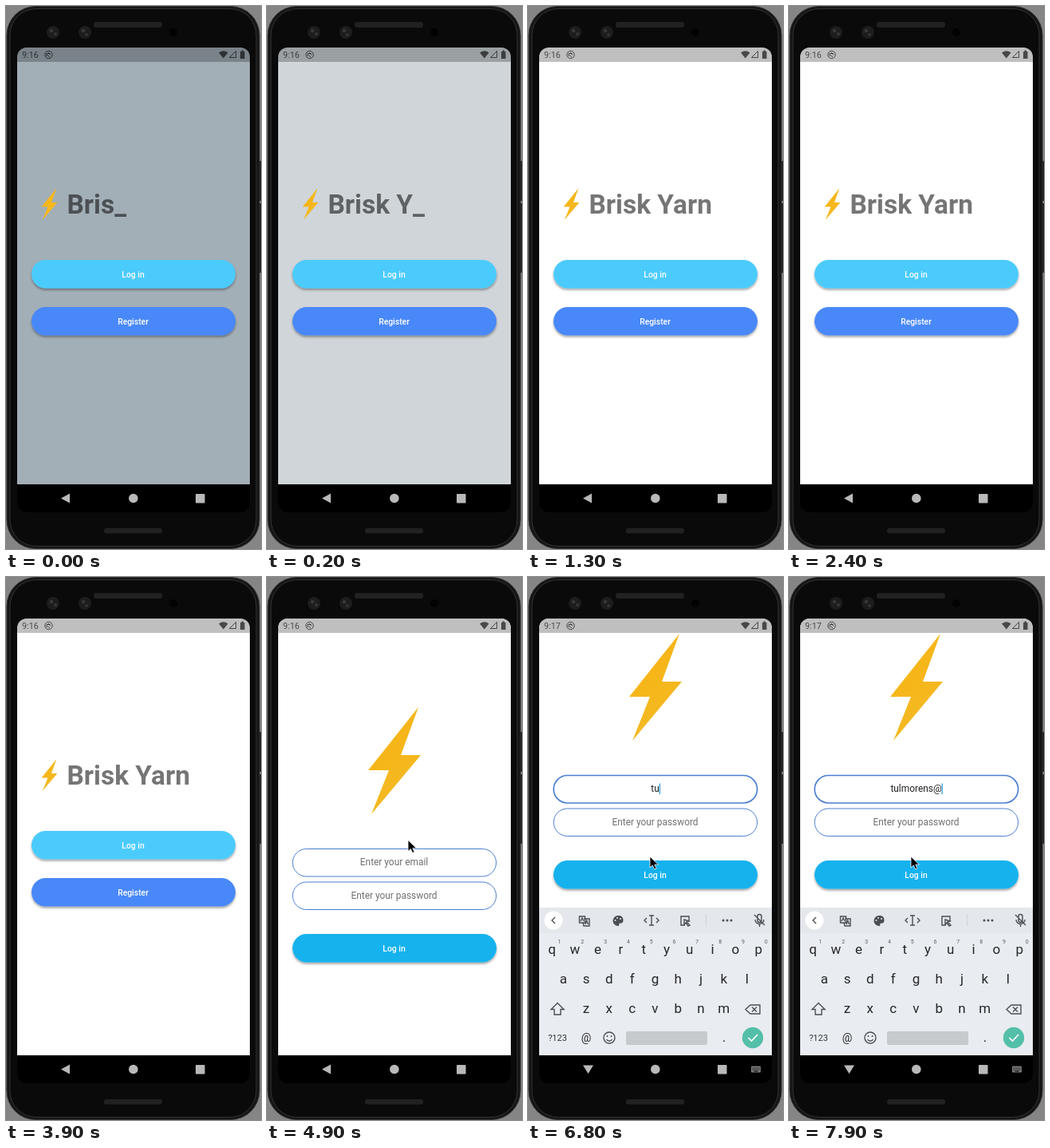
An HTML page for the animation above (8 s loop, 320 px wide and 680 px high).

```html
<!DOCTYPE html>
<html lang="en">
<head>
<meta charset="utf-8">
<style>
  html, body { margin: 0; width: 100%; height: 100%; overflow: hidden; background: #858585; }
  svg { display: block; width: 320px; height: 680px; font-family: Roboto, "Open Sans", sans-serif; }
  .label { font-size: 10.4px; font-weight: 500; fill: #fff; text-anchor: middle; }
  .field { font-size: 11.9px; fill: #6f6f6f; text-anchor: middle; }
  .outline { fill: #fff; stroke: #4a7fd0; }
  .icon { fill: none; stroke: #4b4f54; stroke-width: 1.4; }
  .key { font-size: 17px; fill: #25272a; text-anchor: middle; }
  .digit { font-size: 7px; fill: #5c6065; text-anchor: middle; }
</style>
</head>
<body>
<svg viewBox="0 0 320 680">
  <defs>
    <clipPath id="screenClip"><path d="M14 599V64a12 12 0 0 1 12-12H294a12 12 0 0 1 12 12V599Z"/></clipPath>
    <linearGradient id="gold" x1="0" y1="0" x2="0.3" y2="1">
      <stop offset="0" stop-color="#f5b51b"/>
      <stop offset=".5" stop-color="#f6b619"/>
      <stop offset="1" stop-color="#f3ba25"/>
    </linearGradient>
    <filter id="shadow" x="-5%" y="-20%" width="110%" height="160%">
      <feDropShadow dx="0" dy="2" stdDeviation="1.5" flood-color="#000" flood-opacity=".38"/>
    </filter>
  </defs>

  <!-- phone body -->
  <path d="M316 194h4v50h-4zM316 247h4v87h-4z" fill="#202020"/>
  <rect x="1" y=".5" width="317" height="679" rx="36" fill="#151515" stroke="#303030"/>
  <rect x="5" y="3.5" width="309" height="673" rx="33" fill="#0a0a0a" stroke="#333"/>
  <rect x="110" y="20" width="86" height="7" rx="3" fill="#212121"/>
  <rect x="123" y="654" width="73" height="6.500" rx="3" fill="#212121"/>
  <g fill="#1d1d1d">
    <circle cx="59" cy="33" r="8"/><circle cx="99" cy="33" r="8"/>
    <g fill="#373737"><circle cx="57" cy="31" r="2.300"/><circle cx="62" cy="35" r="2"/><circle cx="97" cy="31" r="2.300"/><circle cx="101" cy="36" r="1.800"/></g>
  </g>
  <circle cx="210" cy="33" r="5" fill="#020202"/>
  <path d="M14 598H306V622a12 12 0 0 1-12 12H26a12 12 0 0 1-12-12Z"/>

  <g clip-path="url(#screenClip)">
    <g id="welcome">
      <rect id="backdrop" x="14" y="52" width="292" height="547"/>
      <text id="title" x="76.500" y="260" font-size="33.460" font-weight="700" fill="#000" fill-opacity=".54"></text>
      <rect x="32" y="318" width="256" height="35.500" rx="17.750" fill="#4bcbfc" filter="url(#shadow)"/>
      <text class="label" x="159.500" y="339.500">Log in</text>
      <rect x="32" y="377" width="256" height="35.500" rx="17.750" fill="#4a88f8" filter="url(#shadow)"/>
      <text class="label" x="159.500" y="398.500">Register</text>
    </g>
    <g id="login">
      <rect x="14" y="52" width="292" height="547" fill="#fff"/>
      <g id="form">
        <rect id="emailBox" class="outline" x="32.200" y="340.500" width="255.400" height="34.500" rx="17.250"/>
        <text id="email" class="field" x="159.500" y="361"></text>
        <rect id="caret" y="350.500" width="1.300" height="13.500" fill="#2f9fe0"/>
        <rect class="outline" x="32.200" y="382" width="255.400" height="34.500" rx="17.250"/>
        <text class="field" x="159.500" y="402.500">Enter your password</text>
        <rect x="32" y="447" width="256" height="35.500" rx="17.750" fill="#12b2ee" filter="url(#shadow)"/>
        <text class="label" x="159.500" y="468.500">Log in</text>
      </g>
    </g>
    <path id="bolt" d="M30-67L-33 12H-7L-29 67L33-7H8Z" fill="url(#gold)"/>
    <g id="keyboard">
      <rect x="14" y="414" width="292" height="186" fill="#e9ecf0"/>
      <rect x="14" y="414" width="292" height="32" fill="#e4e7eb"/>
      <circle cx="32" cy="430" r="11.500" fill="#fff"/>
      <g class="icon">
        <path d="M34 426l-4 4 4 4"/>
        <path d="M64.500 425h7v8h-7zM70 428h7v9h-7l-1-4M72 435l1.700-5 1.700 5M66 431l2-4 2 4"/>
        <path d="M149 427l-3 3 3 3M161 427l3 3-3 3M152 424h6M155 424v12M152 436h6"/>
        <path d="M202 431v-6h-10v11h5M196 429l6 2-3 1 4 4-2 1-3-4-2 2z"/>
        <path d="M288 425a2.500 2.500 0 0 1 5 0v5a2.500 2.500 0 0 1-5 0zM285 429a5.500 5.500 0 0 0 11 0M290.500 435v3M284 423l13 13"/>
        <path d="M37 533.500l8 8h-4v6.500h-8v-6.500h-4z"/>
        <path d="M279 536h12v11h-12l-6-5.500zM281 538.500l6 6M287 538.500l-6 6"/>
        <circle cx="102" cy="577" r="7"/>
        <path d="M98.500 579a4 4 0 0 0 7 0M99.500 574v2M104.500 574v2"/>
      </g>
      <path d="M113 424a6.500 6.500 0 1 0 0 13c2 0 1-2 1.500-3s5 1 5-4-3-6-6.500-6z" fill="#4b4f54"/>
      <g fill="#e4e7eb"><circle cx="109.500" cy="430" r="1"/><circle cx="112" cy="427" r="1"/><circle cx="116" cy="428" r="1"/></g>
      <path d="M223.500 422v16" stroke="#cfd2d6"/>
      <g fill="#4b4f54"><circle cx="245" cy="430" r="1.500"/><circle cx="250" cy="430" r="1.500"/><circle cx="255" cy="430" r="1.500"/></g>
      <g id="keys"></g>
      <text x="37" y="581" font-size="11" fill="#34373b" text-anchor="middle">?123</text>
      <text x="73" y="582" font-size="14" fill="#25272a" text-anchor="middle">@</text>
      <rect x="123" y="569" width="102" height="17" rx="2" fill="#c7cacd"/>
      <text class="key" x="246" y="582">.</text>
      <circle cx="282" cy="577" r="13.200" fill="#54bfa9"/>
      <path d="M276.500 577l4 4 7.500-8" fill="none" stroke="#fff" stroke-width="1.700"/>
    </g>

    <!-- status bar -->
    <rect x="14" y="52" width="292" height="18" fill-opacity=".25"/>
    <g fill="#000" fill-opacity=".62">
      <text id="clock" x="20" y="65" font-size="10.800"></text>
      <path d="M267 58.500q6-4.500 11.500 0l-5.700 7z"/>
      <path d="M294 57h1.500v-1.500h2.500v1.500h1.500v9h-5.500z"/>
    </g>
    <g fill="none" stroke="#000" stroke-opacity=".62">
      <path d="M280.500 64.500h8v-8z"/>
      <circle cx="53.500" cy="61" r="4.700"/>
      <path d="M51 63v-3.500h4.500M52 61.500l3 2.500M53 58l3 3.500"/>
    </g>
  </g>

  <!-- navigation bar -->
  <g fill="#b9b9b9">
    <path id="back"/>
    <circle cx="159.800" cy="616.500" r="5.800"/>
    <rect x="238" y="611" width="11.500" height="11.500" rx=".8"/>
  </g>
  <g id="imeIcon">
    <rect x="280" y="612.500" width="12" height="8" rx="1" fill="#777"/>
    <path d="M281.500 615h9M281.500 617h9" stroke="#000" stroke-dasharray="1 1"/>
    <path d="M283.500 619h5" stroke="#000"/>
  </g>
  <path id="pointer" d="M0 0V14L3.300 11L5.700 16L8 15L5.800 10.200H10.500Z" fill="#000" stroke="#fff" stroke-width=".8"/>
</svg>

<script>
const LOOP = 8000;
const NAME = "Brisk Yarn";
const ADDRESS = "tulmorens@";
const NAV_AT = 4550, FOCUS_AT = 5300, IME_AT = 5480, TYPE_AT = 6500, KEY_MS = 130;

const $ = id => document.getElementById(id);
const set = (id, attrs) => { for (const k in attrs) $(id).setAttribute(k, attrs[k]); };
const show = (id, on) => set(id, { visibility: on ? "visible" : "hidden" });
const write = (id, text) => { if ($(id).textContent !== text) $(id).textContent = text; };
const progress = (t, start, length) => Math.min(1, Math.max(0, (t - start) / length));
const mix = (a, b, k) => a + (b - a) * k;
const smooth = k => k * k * (3 - 2 * k);
const decelerate = k => 1 - (1 - k) ** 3;

function buildKeys() {
  const rows = [["qwertyuiop", 30, 472], ["asdfghjkl", 44.300, 508.500], ["zxcvbnm", 73, 546]];
  $("keys").innerHTML = rows.map(([letters, x0, y], row) => [...letters].map((letter, i) => {
    const x = x0 + i * 28.800;
    const digit = row ? "" : `<text class="digit" x="${x + 9.500}" y="459">${(i + 1) % 10}</text>`;
    return `<text class="key" x="${x}" y="${y}">${letter}</text>${digit}`;
  }).join("")).join("");
}

function drawWelcome(t) {
  const fade = progress(t, 0, 420);
  const rgb = [163, 175, 183].map(c => Math.round(mix(c, 255, fade)));
  set("backdrop", { fill: `rgb(${rgb})` });
  const ticks = Math.floor(4 + t / 60);
  const cursor = ticks <= NAME.length || (ticks < NAME.length + 8 && ticks % 2 === 0);
  write("title", NAME.slice(0, ticks) + (cursor ? "_" : ""));
}

function drawLogin(t, lift) {
  const enter = progress(t, NAV_AT, 300);
  const scale = mix(0.85, 1, decelerate(enter));
  set("login", {
    opacity: progress(enter, 0.1, 0.4),
    transform: `translate(160 325) scale(${scale}) translate(-160 -325)`
  });
  set("form", { transform: `translate(0 ${-lift})` });

  const fly = smooth(enter);
  set("bolt", {
    transform: `translate(${mix(54.500, 160, fly)} ${mix(248, 230, fly) - lift}) scale(${mix(0.3, 1, fly)})`
  });

  const focused = t >= FOCUS_AT;
  set("emailBox", { "stroke-width": focused ? 1.700 : 1 });
  const count = Math.floor(Math.max(0, t - TYPE_AT) / KEY_MS);
  const typed = ADDRESS.slice(0, count);
  write("email", typed || "Enter your email");
  $("email").style.fill = typed ? "#222" : "";
  const half = typed ? $("email").getComputedTextLength() / 2 : 0;
  set("caret", { x: 159.500 + half });
  show("caret", focused && (typed || Math.floor((t - FOCUS_AT) / 500) % 2 === 0));
}

function drawPointer(t) {
  const arrive = smooth(progress(t, 4000, 400));
  const toField = smooth(progress(t, 4950, 300));
  const x = mix(mix(250, 177, arrive), 153, toField);
  const y = mix(mix(395, 329.500, arrive), 350, toField);
  set("pointer", { transform: `translate(${x} ${y})` });
  show("pointer", t >= 4000);
}

function render(t) {
  const rise = decelerate(progress(t, IME_AT, 250));
  const imeOpen = t >= IME_AT;
  drawWelcome(t);
  drawLogin(t, 92 * rise);
  drawPointer(t);
  set("keyboard", { transform: `translate(0 ${186 * (1 - rise)})` });
  show("keyboard", imeOpen);
  show("imeIcon", imeOpen);
  set("back", { d: imeOpen ? "M69 611.500h13l-6.500 10.500z" : "M80 610.500v12l-11-6z" });
  write("clock", t < 5600 ? "9:16" : "9:17");
}

function frame() {
  render(performance.now() % LOOP);
  requestAnimationFrame(frame);
}

buildKeys();
frame();
</script>
</body>
</html>
```
